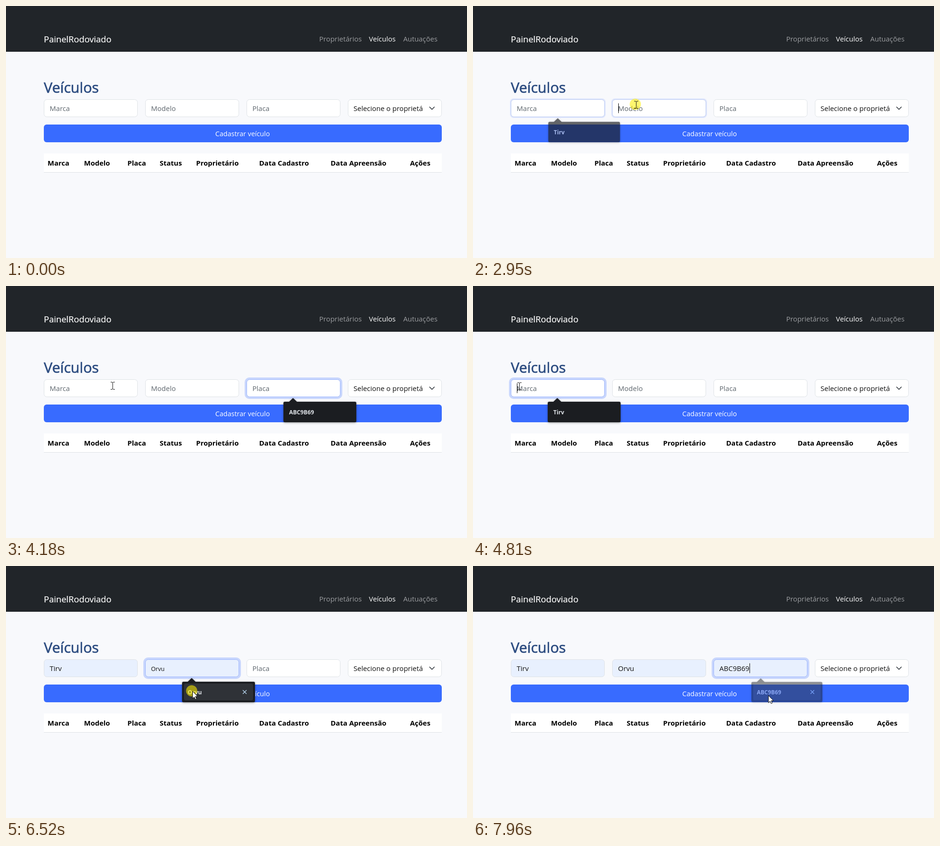
An HTML page for the animation above (8 s loop, 987 px wide and 540 px high).

```html
<!DOCTYPE html>
<html lang="pt">
<head>
<meta charset="utf-8">
<title>Veículos</title>
<style>
  html, body { margin: 0; width: 100%; height: 100%; overflow: hidden; background: #f8f9fc; }
  svg { display: block; width: 987px; height: 540px; }
  text { font-family: "Open Sans", "Noto Sans", sans-serif; font-size: 15px; }
  .brand { font-size: 18.6px; fill: #fff; stroke: #fff; stroke-width: .2; }
  .nav { font-size: 14.9px; fill: #9b9da0; }
  .nav .on { fill: #fff; }
  .title { font-size: 30.9px; fill: #2c4c80; stroke: #2c4c80; stroke-width: .7; }
  .button { font-size: 14.5px; fill: #fff; text-anchor: middle; }
  .head { font-size: 14.9px; font-weight: 700; fill: #000; }
  .box { fill: #fff; stroke: #dee2e6; }
  .hint { fill: #5f676e; }
  .value { fill: #111; }
  .preview { font-size: 12.6px; font-weight: 500; }
  .ring { fill: #386bff; fill-opacity: .25; }
  .edge { fill: none; stroke: #9bb5ff; }
  .caret { stroke: #000; }
  .popup { filter: drop-shadow(0 1px 2px rgba(0, 0, 0, .4)); }
  .popup text { font-size: 12.2px; font-weight: 700; fill: #dfe3e8; }
  .panel { fill: #1b1d21; }
  .item { fill: #2f3237; }
  .cross { stroke: #b9d8f2; stroke-width: 1.4; fill: none; }
</style>
</head>
<body>
<svg viewBox="0 0 987 540">
  <rect width="987" height="540" fill="#f8f9fc"/>
  <rect width="987" height="98" fill="#212529"/>
  <rect y="98" width="987" height="1" fill="#000" opacity=".06"/>
  <text class="brand" x="81" y="78">PainelRodoviado</text>
  <g class="nav">
    <text x="670.5" y="76">Proprietários</text>
    <text class="on" x="777" y="76">Veículos</text>
    <text x="850.5" y="76">Autuações</text>
  </g>
  <text class="title" x="81" y="186">Veículos</text>
  <rect x="81" y="254" width="852" height="38" rx="6" fill="#386bff"/>
  <text class="button" x="506.5" y="279">Cadastrar veículo</text>
  <rect x="81" y="316" width="852" height="40" fill="#fff"/>
  <rect x="81" y="356" width="852" height="1" fill="#dee2e6"/>
  <g class="head">
    <text x="89" y="342">Marca</text>
    <text x="167" y="342">Modelo</text>
    <text x="260" y="342">Placa</text>
    <text x="329" y="342">Status</text>
    <text x="407" y="342">Proprietário</text>
    <text x="542" y="342">Data Cadastro</text>
    <text x="695" y="342">Data Apreensão</text>
    <text x="865" y="342">Ações</text>
  </g>
  <rect class="box" x="732.5" y="200.5" width="200" height="37" rx="6"/>
  <text class="value" x="744" y="225">Selecione o proprietá</text>
  <path d="M907 216.5l5 5l5-5" fill="none" stroke="#343a40" stroke-width="1.7" stroke-linecap="round" stroke-linejoin="round"/>
  <g id="fields"></g>
  <g id="popups"></g>
  <circle id="press" r="12" fill="#fff000" opacity=".57"/>
  <path id="arrow" d="M.5 .5V16L4 12.7L6.4 17.8L8.8 16.7L6.5 11.7H11.3Z" fill="#fff" stroke="#111"/>
  <path id="beam" d="M-4 -7.5H-1L.5 -6.5L2 -7.5H5M.5 -6.5V7M-4 8H-1L.5 7L2 8H5" fill="none" stroke="#111"/>
</svg>
<script>
const LOOP = 8000, TICK = 1000 / 15, PHASE = 16;
const RING_FADE = 140, POPUP_FADE = 120, POPUP_DELAY = 70, BLINK = 480;
const CLICK = 75, HOLD = 130, HOVER_LEAD = 160;

const fields = [['Marca', 'Tirv'], ['Modelo', 'Orvu'], ['Placa', 'ABC9B69']]
  .map(([hint, word], i) => ({ hint, word, x: 81 + 217 * i, visits: [] }));

// Fields are clicked in turn, first only for a look, then with a pick from the popup.
const visits = [
  { at: 2400 }, { at: 2880 }, { at: 3630 },
  { at: 4470, pick: 5225 }, { at: 5780, pick: 6480 }, { at: 7000, pick: 7757 }
];
visits.forEach((v, i) => {
  const f = fields[i % 3];
  v.end = visits[i + 1]?.at ?? LOOP + 1000;
  v.close = v.pick ? v.pick + HOLD : v.end + 30;
  f.visits.push(v);
  if (v.pick) Object.assign(f, { hover: v.pick - HOVER_LEAD, chosen: v.close });
});

// Pointer moves; bow bends a path sideways at its middle.
const origin = [815, 528];
const moves = [
  { from: 720, until: 1490, to: [542, 159], bow: [-120, 0] },
  { from: 1560, until: 2200, to: [172, 209], bow: [0, -100] },
  { from: 2470, until: 2680, to: [349, 211] },
  { from: 3090, until: 3430, to: [530, 211] },
  { from: 3700, until: 4405, to: [99, 214] },
  { from: 4810, until: 5090, to: [200, 283] },
  { from: 5500, until: 5710, to: [330, 213] },
  { from: 6180, until: 6460, to: [399, 268] },
  { from: 6720, until: 6930, to: [555, 213] },
  { from: 7210, until: 7630, to: [632, 277] }
];

const $ = id => document.getElementById(id);
const clamp = v => Math.max(0, Math.min(1, v));
const ease = k => k * k * (3 - 2 * k);
const show = (node, alpha) => node.setAttribute('opacity', +alpha);
const place = (node, x, y) => node.setAttribute('transform', `translate(${x} ${y})`);

function set(node, attrs) {
  for (const key in attrs) node.setAttribute(key, attrs[key]);
  return node;
}
function add(parent, tag, attrs = {}, label = '') {
  const node = document.createElementNS('http://www.w3.org/2000/svg', tag);
  node.textContent = label;
  return parent.appendChild(set(node, attrs));
}

function buildField(f) {
  const g = $('fields');
  const frame = { x: f.x + .5, y: 200.5, width: 200, height: 37, rx: 6 };
  f.ring = add(g, 'rect', { class: 'ring' });
  f.box = add(g, 'rect', { class: 'box', ...frame });
  f.edge = add(g, 'rect', { class: 'edge', ...frame });
  f.text = add(g, 'text', { x: f.x + 12.5, y: 225 });
  f.caret = add(g, 'path', { class: 'caret', d: 'M0 208.5V229.5' });

  const left = f.x + 79;
  f.popup = add($('popups'), 'g', { class: 'popup' });
  add(f.popup, 'path', { class: 'panel', d: `M${left + 11} 249l9.5-9l9.5 9z` });
  add(f.popup, 'rect', { class: 'panel', x: left, y: 248, width: 156, height: 44, rx: 3 });
  f.item = add(f.popup, 'g');
  add(f.item, 'rect', { class: 'item', x: left + 4, y: 252, width: 148, height: 36, rx: 4 });
  add(f.item, 'path', { class: 'cross', d: `M${left + 130} 266l8 8m0-8l-8 8` });
  add(f.popup, 'text', { x: left + 12, y: 275 }, f.word);
}
fields.forEach(buildField);

function drawFocus(f, t) {
  const glow = Math.max(...f.visits.map(v =>
    clamp((t - v.at) / RING_FADE) * clamp(1 - (t - v.end) / RING_FADE)));
  const spread = 4 * glow;
  set(f.ring, { x: f.x - spread, y: 200 - spread, width: 201 + 2 * spread, height: 38 + 2 * spread, rx: 6 + spread });
  show(f.ring, glow);
  show(f.edge, glow);
}

function drawText(f, t) {
  const filled = t >= f.hover, preview = filled && t < f.chosen;
  f.box.style.fill = filled ? '#e8f0fe' : '#fff';
  f.text.textContent = filled ? f.word : f.hint;
  f.text.setAttribute('class', filled ? 'value' + (preview ? ' preview' : '') : 'hint');

  const visit = f.visits.find(v => t >= v.at && t < v.end);
  const since = visit && (t >= f.chosen ? f.chosen : visit.at);
  show(f.caret, visit && !preview && Math.floor((t - since) / BLINK) % 2 === 0 ? 1 : 0);
  const end = filled ? f.text.getComputedTextLength() : 0;
  place(f.caret, Math.round(f.x + 12.5 + end) + .5, 0);
}

function drawPopup(f, t) {
  const visit = f.visits.find(v => t >= v.at + POPUP_DELAY && t < v.close + POPUP_FADE);
  const alpha = visit ? clamp(1 - (t - visit.close) / POPUP_FADE) : 0;
  const cx = f.x + 157, cy = 270;
  show(f.popup, alpha);
  set(f.popup, { transform: `translate(${cx} ${cy}) scale(${.95 + .05 * alpha}) translate(${-cx} ${-cy})` });
  show(f.item, t >= f.hover ? 1 : 0);
}

function pointerAt(t) {
  let point = origin;
  for (const { from, until, to, bow = [0, 0] } of moves) {
    if (t < from) break;
    const k = clamp((t - from) / (until - from));
    point = point.map((p, i) => p + (to[i] - p) * ease(k) + bow[i] * Math.sin(Math.PI * k));
  }
  return point.map(Math.round);
}

function drawPointer(t) {
  const [x, y] = pointerAt(t);
  const visible = t >= moves[0].from;
  const typing = y >= 200 && y < 238 && fields.some(f => x >= f.x && x < f.x + 201);
  const within = (start, span) => t >= start && t < start + span;
  const pressed = visits.some(v => within(v.at, CLICK) || within(v.pick, HOLD));
  show($('arrow'), visible && !typing ? 1 : 0);
  show($('beam'), visible && typing ? 1 : 0);
  show($('press'), pressed ? .57 : 0);
  place($('arrow'), x, y);
  place($('beam'), x, y + .5);
  place($('press'), x - 1.5, y - .5);
}

const start = performance.now();
function frame() {
  const now = (performance.now() - start) % LOOP;
  const t = Math.max(0, Math.floor((now - PHASE) / TICK) * TICK + PHASE);
  for (const f of fields) {
    drawFocus(f, t);
    drawText(f, t);
    drawPopup(f, t);
  }
  drawPointer(t);
  requestAnimationFrame(frame);
}
frame();
</script>
</body>
</html>
```
